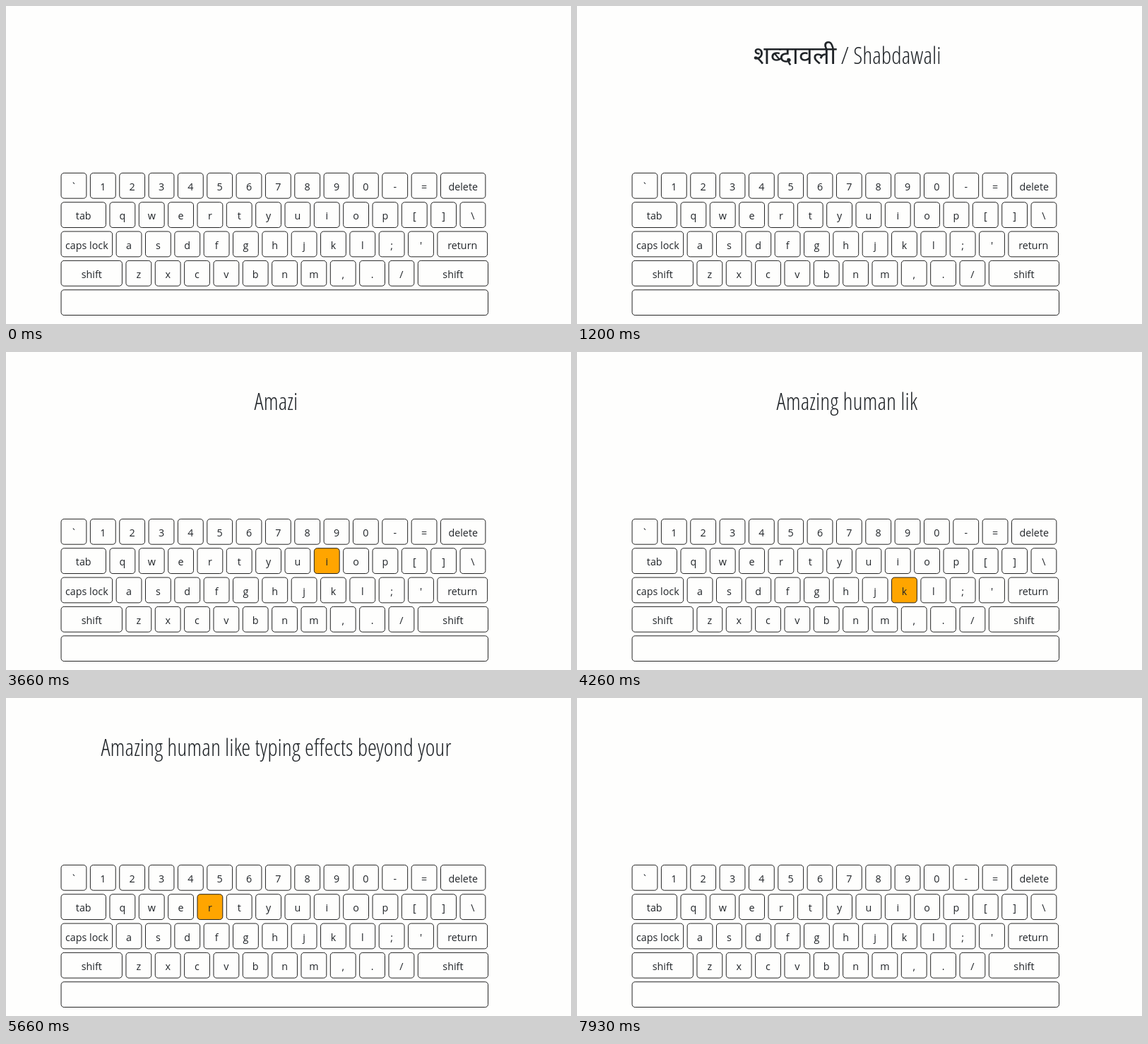
Animation, 800 px wide and 450 px high, one loop 8 s. Source, as an HTML page:

```html
<!DOCTYPE html>
<html lang="en">
<head>
<meta charset="utf-8">
<title>Typing keyboard</title>
<style>
  html, body { margin: 0; width: 100%; height: 100%; overflow: hidden; background: #fefefd; }
  svg { display: block; width: 800px; height: 450px; }
  text { fill: #212529; text-anchor: middle; }
  .key rect { fill: #fefefd; stroke: #111; stroke-width: 1; }
  .key text { font: 400 15.6px "Open Sans", "Noto Sans", sans-serif; }
  .key.down rect { fill: #ffa500; }
  #title {
    font-family: "Open Sans Condensed Light", "Open Sans", "Noto Sans", sans-serif;
    font-size: 33px; font-weight: 300; font-stretch: 75%;
  }
  #hindi {
    font-family: "Noto Sans Devanagari", "Noto Sans", sans-serif;
    font-size: 35.7px; font-weight: 400; font-stretch: 100%;
  }
</style>
</head>
<body>
<svg viewBox="0 0 800 450">
  <g id="keys" transform="translate(77.6 235.9) scale(.9187)"></g>
  <text id="title" x="382.4" y="82"><tspan id="hindi"></tspan><tspan id="latin"></tspan></text>
</svg>
<script>
const LOOP = 8000, HOLD = 40, PITCH = 45, SIZE = 40;
const NS = 'http://www.w3.org/2000/svg';
const $ = id => document.getElementById(id);

// Wide keys are [label, width]; the rest are single square keys
const rows = [
  [...'`1234567890-=', ['delete', 70]],
  [['tab', 70], ...'qwertyuiop[]\\'],
  [['caps lock', 80], ..."asdfghjkl;'", ['return', 78]],
  [['shift', 95], ...'zxcvbnm,./', ['shift', 109]],
  [[' ', 659]]
];
const keys = {};

function add(parent, tag, attrs) {
  const el = parent.appendChild(document.createElementNS(NS, tag));
  for (const name in attrs) el.setAttribute(name, attrs[name]);
  return el;
}

function addKey(label, x, y, w) {
  const g = add($('keys'), 'g', { class: 'key' });
  add(g, 'rect', { x: x + .5, y: y + .5, width: w - 1, height: SIZE - 1, rx: 4.5 });
  add(g, 'text', { x: x + w / 2, y: y + 27.5 }).textContent = label;
  keys[label] = g;
}

rows.forEach((row, r) => {
  let x = 0;
  for (const key of row) {
    const [label, w] = Array.isArray(key) ? key : [key, SIZE];
    addKey(label, x, r * PITCH, w);
    x += w + PITCH - SIZE;
  }
});

// pace: [character index, time it is typed]; wipe: start and end of deletion
const phrases = [
  {
    hindi: 'शब्दावली', latin: ' / Shabdawali',
    pace: [[0, 130], [15, 900], [16, 960], [20, 1160]],
    wipe: [2560, 2860]
  },
  {
    hindi: '', latin: 'Amazing human like typing effects beyond your imagination',
    pace: [[0, 3430], [4, 3660], [15, 4210], [16, 4260], [32, 5060], [33, 5100], [49, 5900], [56, 6220]],
    wipe: [7600, 7930]
  }
];

function typedAt(pace, i) {
  const n = pace.findIndex(p => p[0] >= i);
  const [i1, t1] = pace[n];
  if (i1 === i) return t1;
  const [i0, t0] = pace[n - 1];
  return t0 + (t1 - t0) * (i - i0) / (i1 - i0);
}

for (const p of phrases) {
  p.text = p.hindi + p.latin;
  p.times = [...p.text].map((c, i) => typedAt(p.pace, i));
}

function stateAt(t) {
  const p = phrases.find(p => t >= p.times[0] && t < p.wipe[1]);
  if (!p) return { hindi: '', latin: '', key: null };
  const [start, end] = p.wipe;
  let count, key = null;
  if (t >= start) {
    count = Math.floor(p.text.length * Math.max(0, 1 - (t - start) / (end - start - 30)));
    key = 'return';
  } else {
    count = p.times.filter(time => time <= t).length;
    if (t - p.times[count - 1] < HOLD) key = p.text[count - 1].toLowerCase();
  }
  const split = p.hindi.length;
  return {
    hindi: p.hindi.slice(0, count),
    latin: p.latin.slice(0, Math.max(0, count - split)),
    key
  };
}

function draw() {
  const s = stateAt(performance.now() % LOOP);
  $('hindi').textContent = s.hindi;
  $('latin').textContent = s.latin;
  for (const label in keys) keys[label].classList.toggle('down', label === s.key);
  requestAnimationFrame(draw);
}
draw();
</script>
</body>
</html>
```
